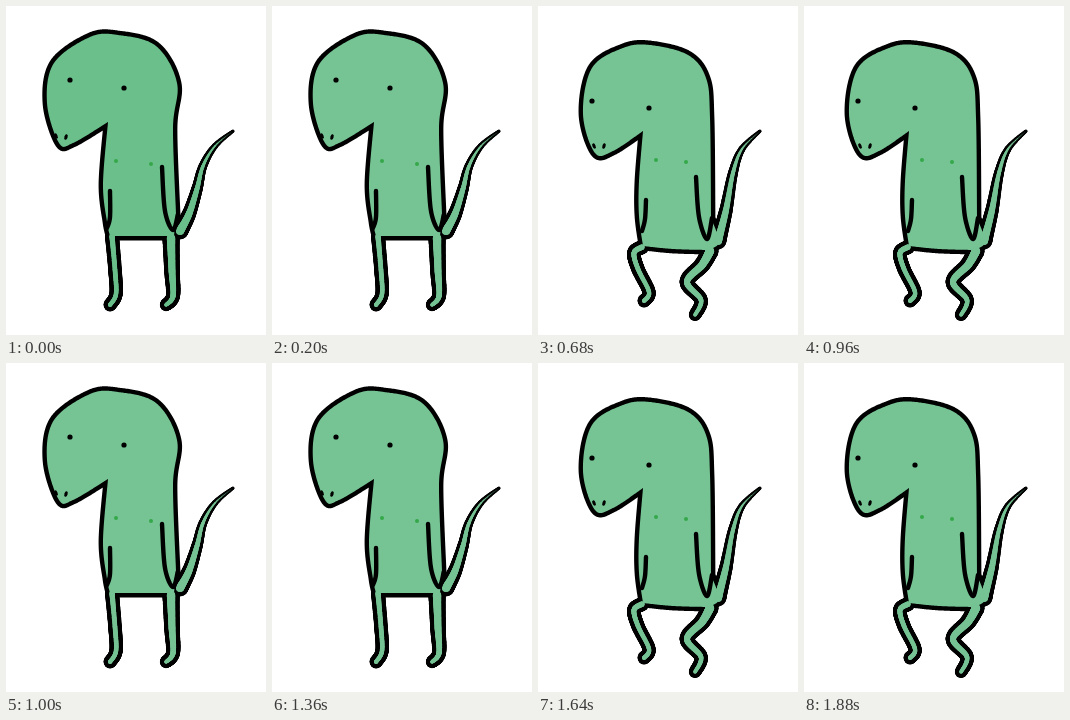
An HTML page with a canvas for the animation above (1.92 s loop, 260 by 329 pixels).

```html
<!DOCTYPE html>
<html lang="en">
<head>
<meta charset="utf-8">
<title>Bouncing lizard</title>
<style>
  html, body { margin: 0; width: 100%; height: 100%; overflow: hidden; background: #fff; }
  canvas { display: block; }
</style>
</head>
<body>
<canvas id="stage" width="260" height="329"></canvas>
<script>
const LOOP = 1920, LINE = 4.4;
const GREEN = [118, 195, 148], DEEP = [106, 191, 139];
const ctx = stage.getContext("2d");
ctx.lineCap = ctx.lineJoin = "round";

// Key points of each pose; "|" marks a corner between smooth curves.
const standing = {
  body: "102,116 | 67,137 53,137 41,97 48,57 84,31 112,29 150,40 171,77 167,122 170,208 | 168,230 | 104,230 | 101,216 97,178 102,116",
  tail: "174,225 183,208 191,183 197,160 209,140 227,125",
  legs: ["106,230 109,264 110,288 104,299", "165,232 166,265 167,290 160,299"],
  arms: ["101,222 104,211 104,185", "172,208 167,224 159,205 156,161"],
  nostrils: "50,130 60,131",
  eyes: "64,74 118,82",
  spots: "110,155 145,158"
};
const crouching = {
  body: "105,125 | 75,145 57,147 45,108 54,62 85,42 112,39 150,49 168,72 172,112 173,212 | 181,236 170,244 | 135,243 105,240 | 101,210 101,175 105,125",
  tail: "180,235 188,204 195,167 204,143 222,125",
  legs: ["104,241 96,247 100,263 111,286 106,295", "172,245 164,259 149,276 163,294 157,309"],
  arms: ["104,225 107,213 108,194", "174,212 169,233 161,211 158,171"],
  nostrils: "56,140 66,140",
  eyes: "54,95 111,102",
  spots: "118,154 148,156"
};

const points = text => text.trim().split(" ").map(s => s.split(",").map(Number));

// Samples a Catmull-Rom curve through the key points.
function curve(text) {
  const out = [];
  let last;
  for (const part of text.split("|")) {
    const p = points(part);
    if (last) p.unshift(last);
    for (let i = 0; i < p.length - 1; i++) {
      const a = p[i], b = p[i + 1], before = p[i - 1] || a, after = p[i + 2] || b;
      for (let s = 0; s <= 1; s += 1 / 32) {
        out.push(a.map((v, k) => v + s / 2 * (b[k] - before[k]
          + s * (2 * before[k] - 5 * v + 4 * b[k] - after[k]
          + s * (3 * v - before[k] - 3 * b[k] + after[k])))));
      }
    }
    last = p[p.length - 1];
  }
  return out;
}

function trace(list) {
  ctx.beginPath();
  for (const [x, y] of list) ctx.lineTo(x, y);
}

function blob(x, y, rx, ry = rx, turn = 0) {
  ctx.beginPath();
  ctx.ellipse(x, y, rx, ry, turn, 0, 2 * Math.PI);
  ctx.fill();
}

// A tapering limb: circles along its centre line.
function limb(text, from, to) {
  const list = curve(text);
  list.forEach(([x, y], i) => blob(x, y, from + (to - from) * i / list.length));
}

function shape(pose, color, edge) {
  ctx.fillStyle = ctx.strokeStyle = color;
  trace(curve(pose.body));
  ctx.closePath();
  ctx.fill();
  if (edge) {
    ctx.lineWidth = 2 * edge;
    ctx.stroke();
  }
  limb(pose.tail, 4 + edge, edge / 3);
  limb(pose.legs[0], 2.6 + edge, 2 + edge);
  limb(pose.legs[1], 4.2 + edge, 1.7 + edge);
}

function drawPose(pose, skin) {
  shape(pose, "#000", LINE);
  shape(pose, skin, 0);

  ctx.fillStyle = "#000";
  ctx.lineWidth = LINE;
  ctx.strokeStyle = "#000";
  for (const arm of pose.arms) {
    trace(curve(arm));
    ctx.stroke();
  }
  points(pose.nostrils).forEach(([x, y], i) => blob(x, y, 1.6, 2.8, i ? 0.3 : -0.4));
  for (const [x, y] of points(pose.eyes)) blob(x, y, 2.6);
  ctx.fillStyle = "#35a84a";
  for (const [x, y] of points(pose.spots)) blob(x, y, 2);
}

function draw(now) {
  const t = now % LOOP;
  const up = t < 440 || (t >= 1000 && t < 1440);
  // The skin lightens in short steps at the start of the loop.
  const k = Math.min(1, Math.floor(t / 40) / 5);
  const skin = DEEP.map((v, i) => Math.round(v + (GREEN[i] - v) * k));
  ctx.fillStyle = "#fff";
  ctx.fillRect(0, 0, 260, 329);
  drawPose(up ? standing : crouching, `rgb(${skin})`);
}

const start = performance.now();
function tick() {
  draw(performance.now() - start);
  requestAnimationFrame(tick);
}
tick();
</script>
</body>
</html>
```
